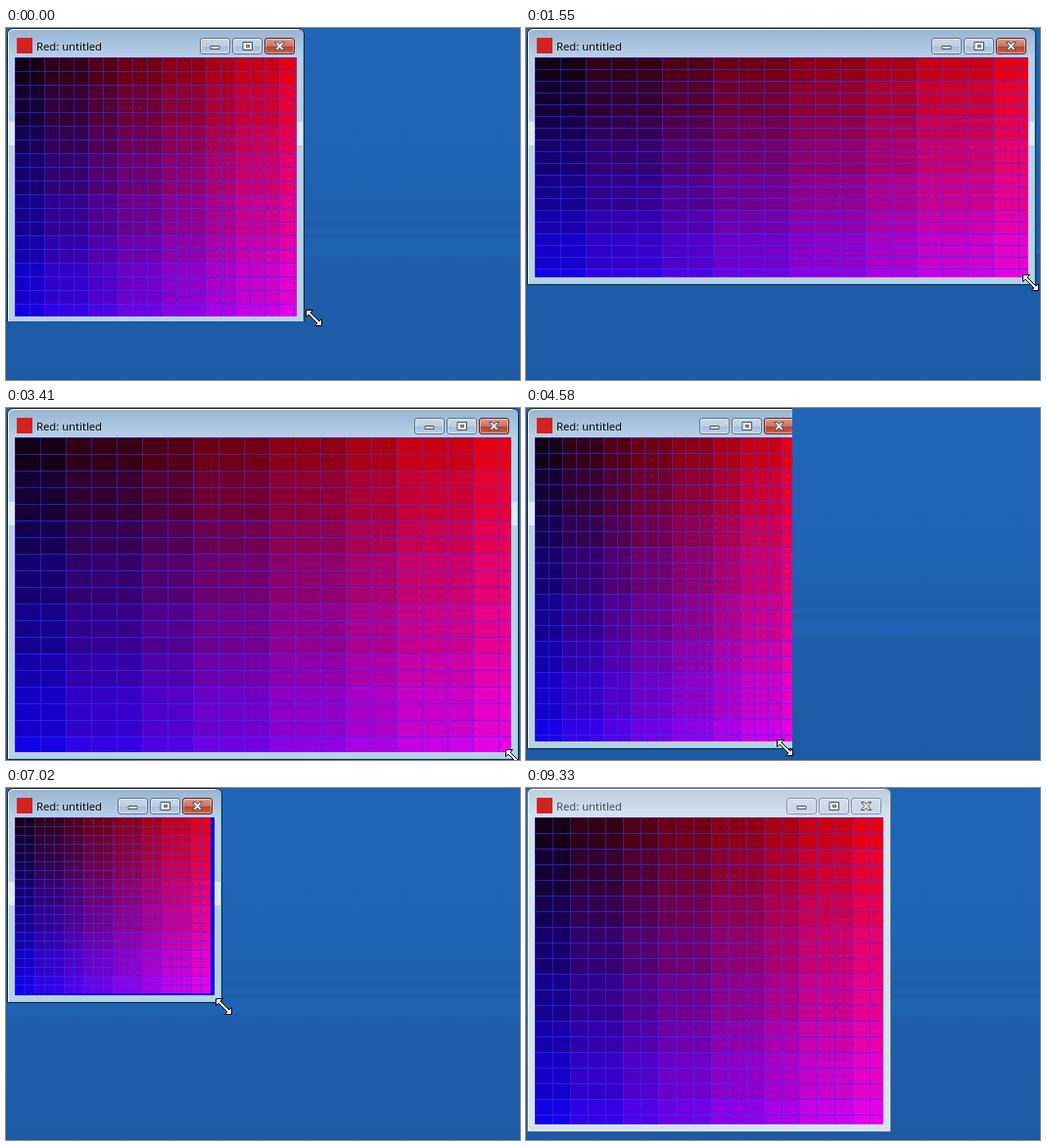
These frames come from a looping animation (525 px wide and 360 px high, 9.43 s). An HTML page:

```html
<!DOCTYPE html>
<html lang="en">
<head>
<meta charset="utf-8">
<title>Resizing window</title>
<style>
html, body { margin: 0; width: 100%; height: 100%; overflow: hidden; background: #2062b3; }
svg { display: block; width: 525px; height: 360px; }
text { font: 11.3px "Open Sans", "Noto Sans", sans-serif; }
.crisp { shape-rendering: crispEdges; }
#cells { isolation: isolate; }
#cells .band { mix-blend-mode: screen; }
</style>
</head>
<body>
<svg viewBox="0 0 525 360">
  <defs>
    <linearGradient id="desk" x1="0" y1="0" x2="0" y2="1">
      <stop offset="0" stop-color="#2164b6"/><stop offset=".42" stop-color="#2062b3"/>
      <stop offset=".55" stop-color="#1f60af"/><stop offset=".64" stop-color="#2062b3"/>
      <stop offset=".645" stop-color="#1e5eab"/><stop offset="1" stop-color="#1c5aa4"/>
    </linearGradient>
    <linearGradient id="on" gradientUnits="userSpaceOnUse" x1="0" y1="0" x2="0" y2="30">
      <stop offset="0" stop-color="#98b3d0"/><stop offset="1" stop-color="#b9d0e9"/>
    </linearGradient>
    <linearGradient id="off" gradientUnits="userSpaceOnUse" x1="0" y1="0" x2="0" y2="30">
      <stop offset="0" stop-color="#bfcddb"/><stop offset="1" stop-color="#d5e2f0"/>
    </linearGradient>
    <linearGradient id="plain" x1="0" y1="0" x2="0" y2="1">
      <stop offset="0" stop-color="#cbdaeb"/><stop offset=".5" stop-color="#bccee3"/>
      <stop offset=".51" stop-color="#a5bcd6"/><stop offset="1" stop-color="#bdd1e7"/>
    </linearGradient>
    <linearGradient id="dim" x1="0" y1="0" x2="0" y2="1">
      <stop offset="0" stop-color="#d3dfeb"/><stop offset="1" stop-color="#c6d4e3"/>
    </linearGradient>
    <linearGradient id="red" x1="0" y1="0" x2="0" y2="1">
      <stop offset="0" stop-color="#dda296"/><stop offset=".5" stop-color="#cc7263"/>
      <stop offset=".51" stop-color="#b5402b"/><stop offset="1" stop-color="#c9674f"/>
    </linearGradient>
    <clipPath id="shown"><rect id="shownBox"/></clipPath>
    <clipPath id="inner"><rect id="innerBox" x="9" y="30"/></clipPath>
    <clipPath id="label"><rect id="labelBox" x="30" y="8" height="20"/></clipPath>
  </defs>

  <rect width="525" height="360" fill="url(#desk)"/>
  <g class="crisp" fill="#1c5ba9" opacity=".55">
    <rect y="197" width="525" height="7"/><rect y="211" width="525" height="4"/>
  </g>

  <g clip-path="url(#shown)">
    <path id="frame"/>
    <g id="shine" class="crisp" fill="#e0eaf4">
      <rect x="3" y="96" width="6" height="24"/><rect id="shineR" y="96" width="6" height="24"/>
    </g>
    <path id="hilite" fill="none" stroke="#f2f8fd"/>
    <path id="glow" class="crisp" fill="none" stroke-opacity=".7"/>
    <rect class="crisp" x="11" y="10" width="16" height="16" fill="#d3221f"/>
    <g clip-path="url(#label)"><text id="title" x="31" y="23"></text></g>
    <g id="buttons"></g>
    <g clip-path="url(#inner)" class="crisp">
      <rect id="base" x="9" y="30" fill="#0808e4"/>
      <g id="cells"><rect id="black" x="9" y="30"/></g>
      <path id="rows" fill="none" stroke="#3a34f0" stroke-opacity=".6"/>
      <path id="cols" fill="none" stroke="#3a34f0" stroke-opacity=".5"/>
    </g>
  </g>
  <path id="cursor" fill="#fff" stroke="#000"
    d="M-8.5-8.5H-1.5L-4-6 5 3 7.5.5V7.5H.5L3 5-6-4-8.5-1.5Z"/>
</svg>
<script>
const LOOP = 9430, TICK = 141.5, N = 20, X0 = 9, Y0 = 30;
const $ = id => document.getElementById(id);
const set = (el, attrs) => { for (const k in attrs) el.setAttribute(k, attrs[k]); return el; };
const add = (parent, tag, attrs) =>
  parent.appendChild(set(document.createElementNS('http://www.w3.org/2000/svg', tag), attrs));

// Path of the window's corner: tick, right, bottom
const path = [
  [0, 304, 302], [3, 430, 268], [8, 504, 258], [11, 520, 262], [13, 521, 262],
  [21, 523, 345], [24, 523, 359], [26, 523, 359], [32, 283, 348], [34, 204, 352],
  [38, 149, 354], [40, 147, 354], [48, 196, 206], [49, 220, 219], [56, 362, 331],
  [58, 371, 345], [60, 372, 351]
];

function cornerAt(n) {
  const next = path.findIndex(k => k[0] > n);
  if (next < 0) return path[path.length - 1].slice(1);
  const [a, b] = [path[next - 1] || path[0], path[next]];
  const p = (n - a[0]) / (b[0] - a[0] || 1);
  return [1, 2].map(k => a[k] + (b[k] - a[k]) * p);
}

// Even ramp mixed with coarse colour levels
function shade(i) {
  const level = Math.ceil((i + .99) / 2.6) - 1;
  return 20 + 22 * level + 3 * i;
}

const redBands = [], blueBands = [];
for (let i = 0; i < N; i++) {
  redBands.push(add($('cells'), 'rect', { class: 'band', y: Y0, fill: `rgb(${shade(i)},0,0)` }));
  blueBands.push(add($('cells'), 'rect', { class: 'band', x: X0, fill: `rgb(0,0,${shade(i)})` }));
}

const glyphs = [
  'M209 18.5H218V21.5H209Z',
  'M242 14.5H251.5V22.5H242ZM245.5 17.5V19.5H248.5V17.5Z',
  'M274.5 14.5H277.5L279.5 16.8 281.5 14.5H284.5L281.3 18.5 284.5 22.5H281.5L279.5 20.2 277.5 22.5H274.5L277.7 18.5Z'
];
const faces = glyphs.map((d, i) => {
  const face = add($('buttons'), 'rect',
    { x: 198.5 + 33 * i, y: 10.5, width: 30, height: 16, rx: 2.5 });
  add($('buttons'), 'rect', { x: 199.5 + 33 * i, y: 11.5, width: 28, height: 14, rx: 2,
    fill: 'none', stroke: '#fff', 'stroke-opacity': .4 });
  add($('buttons'), 'path', { d, fill: '#fff', stroke: '#454f5e', 'fill-rule': 'evenodd' });
  return face;
});

function caption(room) {
  const full = 'Red: untitled';
  return room >= 68 ? full : full.slice(0, Math.max(1, Math.floor((room - 9) / 5.2))) + '...';
}

function drawFrame(right, bottom, active) {
  const r = right + .5, b = bottom + .5;
  set($('frame'), {
    d: `M1.5 ${b}V6.5Q1.5.5 7.5.5H${r - 6}Q${r}.5 ${r} 6.5V${b}Z`,
    fill: `url(#${active ? 'on' : 'off'})`,
    stroke: active ? '#182534' : '#66788b'
  });
  set($('hilite'), { d: `M2.5 ${b - 1}V7Q2.5 1.5 8 1.5H${r - 6.5}` });
  set($('glow'), { d: `M${r - 1} 7V${b - 1}H3`, stroke: active ? '#54cdec' : '#e4edf6' });
  set($('shine'), { opacity: active ? 1 : .25 });
  set($('shineR'), { x: right - 7 });

  set($('labelBox'), { width: right - 138 });
  set($('title'), { fill: active ? '#000' : '#3d4650' }).textContent = caption(right - 141);
  set($('buttons'), { transform: `translate(${right - 304})` });
  faces.forEach((f, i) => set(f, {
    fill: `url(#${!active ? 'dim' : i === 2 ? 'red' : 'plain'})`,
    stroke: !active ? '#8493a5' : i === 2 ? '#5b2a2a' : '#60738b'
  }));
}

function drawGrid(cw, ch) {
  const width = cw * N, height = ch * N;
  let rows = '', cols = '';
  set($('black'), { width, height });
  for (let i = 0; i < N; i++) {
    const x = X0 + i * cw, y = Y0 + i * ch;
    set(redBands[i], { x, width: cw, height });
    set(blueBands[i], { y, width, height: ch });
    cols += `M${x + .5} ${Y0}v${height}`;
    rows += `M${X0} ${y + .5}h${width}`;
  }
  set($('rows'), { d: rows });
  set($('cols'), { d: cols });
}

function draw(t) {
  const n = Math.floor((t + 10) / TICK);
  const [right, bottom] = cornerAt(n).map(Math.round);
  // The pointer runs ahead of the window, the grid lags behind it
  const [ahead, below] = cornerAt(n + .35);
  const px = Math.round(ahead - 4), py = Math.round(below - 1);
  const [oldRight, oldBottom] = cornerAt(n - .2);

  set($('shownBox'), { width: px + 7, height: py + 3 });
  drawFrame(right, bottom, n < 66);
  for (const id of ['innerBox', 'base'])
    set($(id), { width: right - 7 - X0, height: bottom - 7 - Y0 });
  drawGrid(Math.ceil((oldRight - 7 - X0) / N), Math.ceil((oldBottom - 7 - Y0) / N));
  set($('cursor'), {
    transform: `translate(${px} ${py})`,
    visibility: n < 62 ? 'visible' : 'hidden'
  });
}

const begin = performance.now();
function tick() {
  draw((performance.now() - begin) % LOOP);
  requestAnimationFrame(tick);
}
tick();
</script>
</body>
</html>
```
